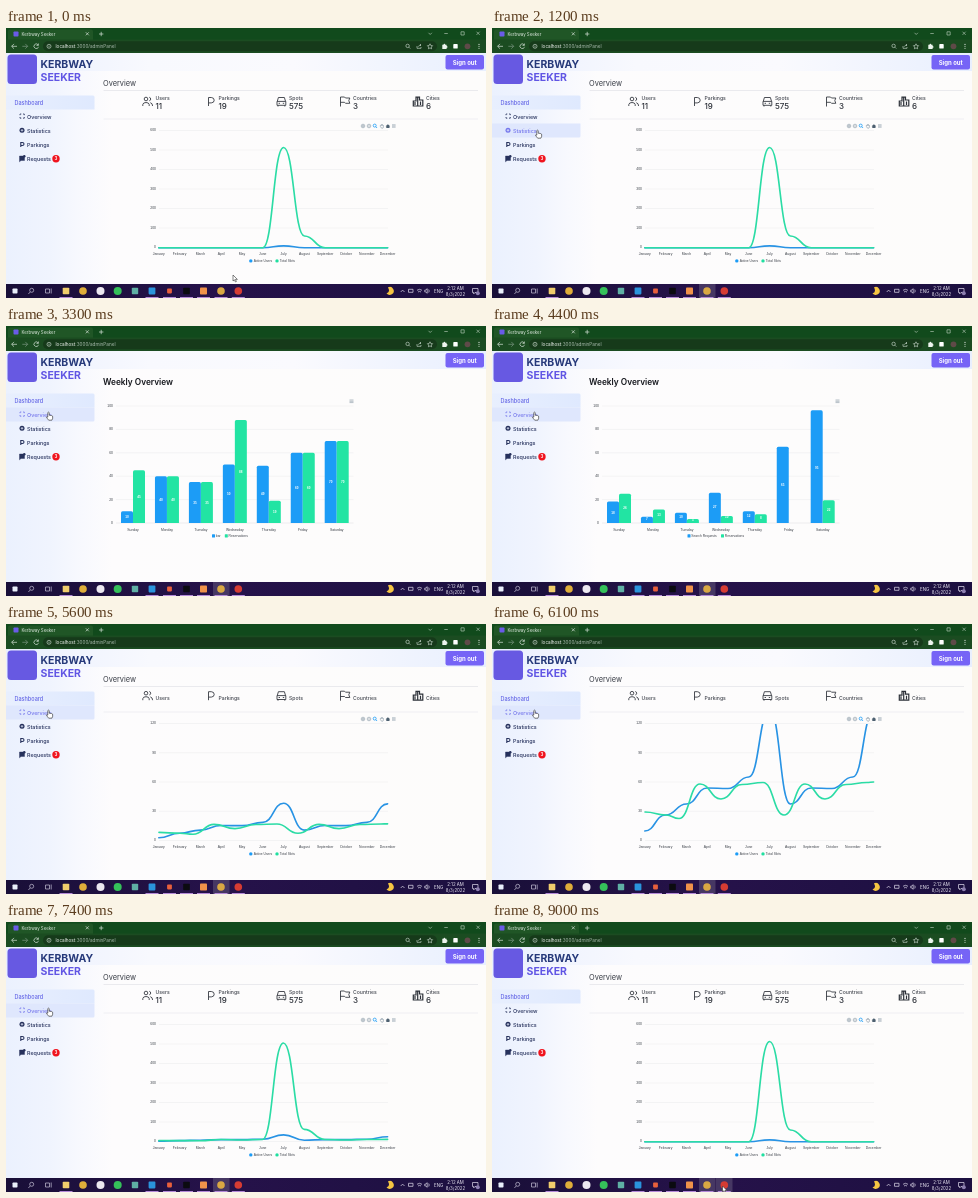
These frames come from a looping animation (480 px wide and 270 px high, 9.1 s). An HTML page:

```html
<!DOCTYPE html>
<html lang="en">
<head>
<meta charset="utf-8">
<title>Kerbway Seeker</title>
<style>
  html, body { margin: 0; width: 100%; height: 100%; overflow: hidden; background: #fff; }
  svg { display: block; width: 100vw; height: 100vh; }
  text { font-family: Inter, "Open Sans", sans-serif; }
  .b { font-weight: 700; }
  .s { font-weight: 600; }
  .m { font-weight: 500; }
  .chart text { font: 3.4px "Liberation Sans", Arial, sans-serif; fill: #3a3f47; }
  .chart .val { font-size: 3.1px; font-weight: 700; fill: #fff; text-anchor: middle; }
  .mid { text-anchor: middle; }
  .end { text-anchor: end; }
  .ui { font-family: "Open Sans", "Noto Sans", sans-serif; }
  .line { fill: none; stroke-width: 1.65; stroke-linejoin: round; stroke-linecap: round; }
  .item { fill: #26315c; stroke: #26315c; }
  .item text { stroke: none; }
  .item .band { fill: none; stroke: none; }
  .item.on { fill: #7577ec; stroke: #7577ec; }
  .item.on .band { fill: #dfe7fd; }
</style>
</head>
<body>
<svg viewBox="0 0 480 270" preserveAspectRatio="none">
  <defs>
    <linearGradient id="page">
      <stop offset="0" stop-color="#ebf1fe"/><stop offset=".09" stop-color="#f0f4fe"/>
      <stop offset=".16" stop-color="#f8f9fe"/><stop offset=".22" stop-color="#fdfcfd"/>
      <stop offset="1" stop-color="#fdfcfb"/>
    </linearGradient>
    <linearGradient id="head">
      <stop offset="0" stop-color="#e9effe"/><stop offset=".3" stop-color="#f8f9fe"/>
      <stop offset=".6" stop-color="#fafafe"/><stop offset="1" stop-color="#e8effe"/>
    </linearGradient>
    <linearGradient id="band">
      <stop offset="0" stop-color="#e8effe"/><stop offset="1" stop-color="#dfe9fe"/>
    </linearGradient>
    <linearGradient id="task">
      <stop offset="0" stop-color="#190f38"/><stop offset=".45" stop-color="#26124a"/>
      <stop offset="1" stop-color="#1c1040"/>
    </linearGradient>
    <clipPath id="plot"><rect x="150" y="100" width="234" height="122"/></clipPath>
    <clipPath id="barBox"><rect x="108" y="78" width="242" height="119"/></clipPath>
  </defs>

  <rect width="480" height="270" fill="url(#page)"/>
  <rect y="25" width="480" height="18" fill="url(#head)"/>

  <!-- browser -->
  <g class="ui">
    <rect width="480" height="12" fill="#114a1c"/>
    <path d="M2 12V3.500q0-2 2-2h81q2 0 2 2V12z" fill="#205626"/>
    <rect y="11.500" width="480" height="13.500" fill="#1b4c21"/>
    <rect x="37" y="13.300" width="394" height="10" rx="5" fill="#163a1a"/>
    <rect x="7.500" y="3.500" width="5" height="5" rx=".8" fill="#6a5be8"/>
    <text x="15.500" y="7.700" font-size="4.400" fill="#dfeae1">Kerbway Seeker</text>
    <text x="49.500" y="20" font-size="4.650" fill="#f2f6f3">localhost<tspan fill="#a9bbae">:3000/adminPanel</tspan></text>
    <g fill="none" stroke="#d6e2d8" stroke-width=".7">
      <path d="M79.800 4.300l3 3m0-3l-3 3M93 6h4.400M95.200 3.800v4.400"/>
      <path d="M422.500 4.800l1.700 1.700 1.700-1.700M438.300 5.500h3.500M455 3.800h3.200v3.200H455zM470.500 3.700l3.200 3.200m0-3.200l-3.200 3.200" stroke="#a9c0ad"/>
      <path d="M11 18.300H5.700m2.300-2.400l-2.400 2.400 2.400 2.400"/>
      <path d="M16.300 18.300h5.300m-2.300-2.400l2.400 2.400-2.400 2.400" stroke="#7d9884"/>
      <path d="M32 16.700a2.300 2.300 0 1 0 .5 2.100M32.400 15.500v1.900h-1.900"/>
      <g stroke-width=".6"><circle cx="43" cy="18.300" r="2"/><path d="M43 17.900v1.500M43 17v.4"/>
      <circle cx="401.600" cy="17.900" r="1.700"/><path d="M402.900 19.200l1.400 1.400M411 18v2.300h4V19M412.500 18.700q.3-1.700 2.500-1.700m-1-1l1 1-1 1"/>
      <path d="M424 15.800l.8 1.700 1.800.2-1.300 1.300.3 1.800-1.600-.9-1.600.9.300-1.800-1.300-1.300 1.800-.2z"/></g>
    </g>
    <path d="M436.300 16.700h1.200a.9.900 0 0 1 1.800 0h1.300v1.300a.9.900 0 0 1 0 1.800v1.200h-4.300z" fill="#eef5ef"/>
    <rect x="447.300" y="16" width="4.400" height="4.600" rx=".7" fill="#fff"/>
    <circle cx="461.500" cy="18.300" r="2.900" fill="#5f4a48"/>
    <g fill="#e3ece5"><circle cx="473" cy="16.400" r=".55"/><circle cx="473" cy="18.300" r=".55"/><circle cx="473" cy="20.200" r=".55"/></g>
  </g>

  <!-- page header -->
  <rect x="1.500" y="26.500" width="29.500" height="29.500" rx="3.500" fill="#6759e2"/>
  <text class="b" x="34.500" y="39.500" font-size="10.500" fill="#26397a">KERBWAY</text>
  <text class="b" x="34.500" y="52.500" font-size="10.500" fill="#6156e4">SEEKER</text>
  <rect x="439.500" y="27" width="38.500" height="14.500" rx="2" fill="#7664f6"/>
  <text class="b mid" x="458.700" y="36.500" font-size="6" fill="#fff">Sign out</text>

  <!-- sidebar -->
  <path d="M0 67.500h87q1.500 0 1.500 1.500v12.500H0z" fill="url(#band)"/>
  <text class="m" x="8.500" y="76.500" font-size="5.500" fill="#6466e6">Dashboard</text>
  <g id="menu"></g>
  <circle cx="50" cy="130.700" r="3.700" fill="#f0141e"/>
  <text class="b mid" x="50" y="132.300" font-size="4.400" fill="#fff">3</text>

  <!-- overview page -->
  <g id="overview">
    <text x="97" y="57.700" font-size="7.400" fill="#3a3e47">Overview</text>
    <path d="M97.500 62.500H472" stroke="#e2e3e9" stroke-width=".7"/>
    <g id="lower">
      <path d="M97.500 91H472" stroke="#e8e9ee" stroke-width=".7"/>
      <g id="stats"></g>
      <g class="chart">
        <g fill="none" stroke="#8595a3" stroke-width=".6">
          <circle cx="357" cy="98" r="1.800"/><path d="M356 98h2M357 97v2"/>
          <circle cx="363" cy="98" r="1.800"/><path d="M362 98h2"/>
          <g stroke="#1c9cf6" stroke-width=".8"><circle cx="368.700" cy="97.600" r="1.500"/><path d="M369.800 98.700l1.300 1.300"/></g>
          <path d="M374.400 98.500v-1.500m1-1v2m1-2v2m1-1v2q0 1.300-1.300 1.300-1 0-1.700-1.800"/>
          <path d="M386 96.800h3.600M386 98h3.600M386 99.200h3.600"/>
        </g>
        <path d="M379.600 98.200l2.300-2 2.300 2h-.7v1.700h-3.200v-1.700z" fill="#4d6070"/>
        <g id="lineGrid"></g>
        <circle cx="244.800" cy="232.900" r="1.700" fill="#1c9cf6"/><text x="247.700" y="234.200" style="font-size:3.300px">Active Users</text>
        <circle cx="271" cy="232.900" r="1.700" fill="#20dfa0"/><text x="273.800" y="234.200" style="font-size:3.300px">Total Slots</text>
      </g>
    </g>
    <g clip-path="url(#plot)">
      <path id="users" class="line" stroke="#2893e4"/>
      <path id="slots" class="line" stroke="#2bdca5"/>
    </g>
  </g>

  <!-- statistics page -->
  <g id="weekly" class="chart">
    <text x="97" y="59" style="font:600 8.300px Inter,sans-serif;fill:#14161c">Weekly Overview</text>
    <path d="M343.500 74h4M343.500 75.300h4M343.500 76.600h4" stroke="#8595a3" stroke-width=".6"/>
    <g id="barGrid"></g>
    <g id="bars" clip-path="url(#barBox)"></g>
    <g id="legend"></g>
  </g>

  <!-- taskbar -->
  <rect y="256" width="480" height="14" fill="url(#task)"/>
  <g id="tasks" class="ui"></g>

  <g id="arrow"><path d="M0 0v6l1.400-1.200 1 2.100 1-.4-1-2.100h2z" fill="#fff" stroke="#333" stroke-width=".6"/></g>
  <g id="hand"><path d="M-.7.600q.7-1 1.400 0v2.600q2.500 0 3.400 1 .5 2.100-.7 4H.2q-1.400-1.500-2.200-3.200.4-1 1.300.1z" fill="#fff" stroke="#222" stroke-width=".6"/></g>
</svg>

<script>
const LOOP = 9100, BLUE = '#1c9cf6', GREEN = '#22e4a3';
const TO_STATS = 1250, GROW = 1350, REAL_BARS = 3850, TO_OVERVIEW = 5300, REAL_LINES = 6700;
const $ = id => document.getElementById(id);
const clamp = v => Math.min(1, Math.max(0, v));
const mix = (a, b, k) => a + (b - a) * k;
const swing = p => { const u = clamp(p) - 1; return u * u * (2.70158 * u + 1.70158) + 1; };
const sine = p => (1 - Math.cos(Math.PI * clamp(p))) / 2;
const show = (el, on) => el.setAttribute('display', on ? 'inline' : 'none');
const label = (x, y, s, cls = 'mid') => `<text class="${cls}" x="${x}" y="${y}">${s}</text>`;

// sidebar
const glyphs = [
  '<path d="M14 87.200v-1.200h1.300M17 86h1.300v1.200M18.300 89v1.200H17M15.300 90.200H14V89" fill="none" stroke-width=".8"/>',
  '<circle cx="16" cy="102.300" r="2.500" stroke="none"/><path d="M14.700 102.300h2.600M16 101v2.600" stroke="#eaf0ff" stroke-width=".7"/>',
  '<path d="M14.800 119v-4.500h1.500q1.700.1 1.700 1.500t-1.700 1.500h-1.400" fill="none" stroke-width="1.100"/>',
  '<path d="M13.500 128h5v4.500h-3.500l-1.500 1.300z" stroke-width=".4"/><circle cx="18.300" cy="128.300" r="1.200" stroke="none"/>'
];
$('menu').innerHTML = ['Overview', 'Statistics', 'Parkings', 'Requests'].map((s, i) =>
  `<g class="item"><path class="band" d="M0 ${81.5 + i * 14}h88.500v12.500q0 1.500-1.500 1.500H0z"/>${glyphs[i]}
   <text class="m" x="21" y="${90.5 + i * 14}" font-size="5.400">${s}</text></g>`).join('');
const items = [...document.querySelectorAll('.item')];

// figures above the line chart
const icons = [
  '<circle cx="140" cy="71" r="1.800"/><path d="M136.800 78v-1.500q.3-2 3.200-2t3.200 2V78M143.300 69.300a1.800 1.800 0 0 1 0 3.500M144.300 74.700q2.300.5 2.300 3.300"/>',
  '<path d="M202.500 78v-8.500h2.800q2.900.2 2.900 2.700t-2.900 2.700h-2.700"/>',
  '<path d="M271.300 73.300l1.100-3.800h6l1.100 3.800M271 73.400h8.800v3.900H271zM272 77.300v1.200M278.800 77.300v1.200M272.600 75.300h1.400M276.800 75.300h1.400"/>',
  '<path d="M334.500 78.500v-9.500h4l1 1h4.300l-1 2.600 1 2.700h-4.300l-1-1h-4"/>',
  '<path d="M407.300 78v-5h2.700v-3.800h3.500v2.800h3.300v6zM411.700 69.200V78M409 74v3M414.500 73.500V77" stroke-width="1.200"/>'
];
const stats = [['Users', 149.5, 11], ['Parkings', 212.5, 19], ['Spots', 283, 575], ['Countries', 347, 3], ['Cities', 420, 6]];
$('stats').innerHTML = stats.map(([s, x, n], i) =>
  `<g fill="none" stroke="#2c3038" stroke-width=".85">${icons[i]}</g>
   <text class="m name" x="${x}" y="71.700" font-size="5.100" fill="#40444d">${s}</text>
   <text class="m count" x="${x}" y="80.700" font-size="8" fill="#2c3038">${n}</text>`).join('');

// line chart
const monthX = i => 152.8 + i * 20.8;
const months = ['January', 'February', 'March', 'April', 'May', 'June', 'July',
  'August', 'September', 'October', 'November', 'December'];
function lineGrid(max, steps) {
  let s = '';
  for (let i = 0; i <= steps; i++) {
    const y = 219.5 - i * 117 / steps;
    s += `<path d="M153 ${y}H382" stroke="#e9e9eb" stroke-width=".5"/>` + label(150, y + .9, max / steps * i, 'end');
  }
  return s + months.map((m, i) => label(monthX(i), 227.2, m)).join('');
}
const draftUsers = [207, 191, 180, 164, 164.5, 153, 86, 180, 164, 164.5, 153, 88].map((y, i) => [monthX(i), y]);
const realUsers = draftUsers.map(([x], i) => [x, i === 6 ? 217.8 : 219.7]);
const draftSlots = [[153, 188], [174, 191], [187, 194.5], [208, 160], [229, 175], [250, 160.5], [271, 158.5],
  [292, 191], [313, 160], [333, 175], [354, 160.5], [375, 158.5], [381.6, 158]];
const realSlots = draftSlots.map((p, i) => [monthX(Math.min(i, 11)), i === 6 ? 119.5 : i === 7 ? 208 : 219.7]);

function curve(pts) {
  return pts.map(([x, y], i) => {
    if (!i) return `M${x} ${y}`;
    const [px, py] = pts[i - 1], m = (px + x) / 2;
    return `C${m} ${py} ${m} ${y} ${x} ${y}`;
  }).join('');
}
function trace(draft, real, t, loaded) {
  const up = sine((t - TO_OVERVIEW - 50) / 700), k = loaded ? sine((t - REAL_LINES) / 800) : 0;
  if (t < TO_OVERVIEW) return curve(real);
  return curve(draft.map(([x, y], i) => [mix(x, real[i][0], k), mix(mix(216.5, y, up), real[i][1], k)]));
}

// bar chart
const days = ['Sunday', 'Monday', 'Tuesday', 'Wednesday', 'Thursday', 'Friday', 'Saturday'];
const draftBars = [[10, 45], [40, 40], [35, 35], [50, 88], [49, 19], [60, 60], [70, 70]];
const realBars = [[18, 26], [7, 13], [10, 5], [27, 10], [12, 8], [65, 0], [95, 22]];
const dayX = i => 127 + i * 33.95;
let grid = '';
for (let i = 0; i <= 5; i++) {
  const y = 197 - i * 23.4;
  grid += `<path d="M110 ${y}H347.500" stroke="${i ? '#e9e9eb' : '#d8d9dd'}" stroke-width=".5"/>` + label(107, y + .9, i * 20, 'end');
}
$('barGrid').innerHTML = grid + days.map((d, i) => label(dayX(i), 204.6, d)).join('');

function bars(t) {
  const real = t >= REAL_BARS;
  let rects = '', vals = '';
  days.forEach((_, i) => [0, 1].forEach(j => {
    const a = draftBars[i][j], b = realBars[i][j], goal = real ? b : a;
    const v = real ? mix(a, b, swing((t - REAL_BARS) / 700))
                   : a * swing((t - GROW - i * 110 - j * 8) / 1000);
    const x = dayX(i) - 12 + j * 12, h = Math.max(0, v * 1.17), r = Math.min(1.6, h);
    if (h > .1) rects += `<path d="M${x} 197v${r - h}q0 ${-r} ${r} ${-r}h${12 - 2 * r}q${r} 0 ${r} ${r}V197z" fill="${j ? GREEN : BLUE}"/>`;
    if (goal && t > GROW) vals += label(x + 6, 198.1 - goal * .585, goal, 'val');
  }));
  return rects + vals;
}
function legend(real) {
  const x = real ? 195.5 : 206, x2 = real ? 229 : 218.8;
  return [[x, BLUE, real ? 'Search Requests' : 'bar'], [x2, GREEN, 'Reservations']].map(([lx, c, s]) =>
    `<rect x="${lx}" y="208.300" width="3" height="3.200" rx=".5" fill="${c}"/>
     <text x="${lx + 3.8}" y="211.200" style="font-size:3.300px">${s}</text>`).join('');
}

// taskbar
const disc = (x, c, r = 4) => `<circle cx="${x}" cy="263" r="${r}" fill="${c}"/>`;
const box = (x, c, r = 3.6) => `<rect x="${x - r}" y="${263 - r}" width="${2 * r}" height="${2 * r}" rx=".8" fill="${c}"/>`;
const tile = (id, x) => `<rect id="${id}" x="${x}" y="256" width="16.500" height="14" fill="#463763"/>`;
$('tasks').innerHTML =
  tile('browserTile', 207) + tile('recordTile', 224) + box(9, '#e9effa', 2.5) +
  '<g fill="none" stroke="#c9c4d8" stroke-width=".7"><circle cx="25.700" cy="262.300" r="2"/><path d="M24.200 264l-1.800 2M39.500 261h4v4h-4zM45.200 260.500v5"/></g>' +
  box(60, '#f0cd6c', 3.3) + disc(77, '#dfae3a', 3.8) + disc(94.5, '#ece8f0') + disc(111.7, '#35c15a') + box(129, '#5fb0a4', 3.2) +
  box(146, '#2a94dc', 3.4) + box(163.5, '#e8603c', 2.4) + box(180.5, '#0b0b10', 3.3) + box(197.5, '#f0924a', 3.5) +
  disc(215, '#d9a843', 3.8) + disc(232.3, '#d63c33', 3.8) +
  [60, 146, 163.5, 180.5, 197.5, 215, 232.3].map(x => `<path d="M${x - 6.5} 269.500h13" stroke="#b48ad8" stroke-width="1"/>`).join('') +
  '<path d="M382 259.300a4 4 0 1 1-1.500 6q4-.8 1.500-6z" fill="#f5c542"/>' +
  '<g fill="none" stroke="#e2dfee" stroke-width=".7"><path d="M394.700 264l1.900-1.900 1.900 1.900M402.500 261.300h4.500v3h-4.500zM411 262.300q2.500-2 5 0M412 264q1.500-1.200 3 0M418.800 262v2h1l1.400 1.300v-4.600l-1.400 1.300zM422.700 261.500q1 1.500 0 3"/>' +
  '<path d="M466.500 260.500h5.500v4h-3l-1.300 1.400v-1.400h-1.200z"/></g>' +
  '<circle cx="471.800" cy="265.200" r="2" fill="#8d7fb0"/>' +
  '<g fill="#ece9f5" font-size="4.400"><text x="428" y="264.700">ENG</text><text class="mid" x="449.500" y="261.700">2:12 AM</text><text class="mid" x="449.500" y="268">8/3/2022</text></g>';

// pointer stops: time, x, y
const stops = [[0, 227, 247], [80, 227, 247], [950, 48, 109], [1200, 45.5, 102], [3050, 45.5, 102],
  [3250, 42.5, 86], [7550, 42.5, 86], [8200, 203, 217], [8650, 230.5, 264], [LOOP, 230.5, 264]];
function pointer(t) {
  const i = stops.findIndex((s, n) => n && t <= s[0]);
  const a = stops[i - 1], b = stops[i], k = sine((t - a[0]) / (b[0] - a[0]));
  return [mix(a[1], b[1], k), mix(a[2], b[2], k)];
}

const grids = { draft: lineGrid(120, 4), real: lineGrid(600, 6) };
const texts = { names: document.querySelectorAll('.name'), counts: document.querySelectorAll('.count') };
let mode = '';
function setOverview(loaded) {
  $('lineGrid').innerHTML = loaded ? grids.real : grids.draft;
  $('lower').setAttribute('transform', `translate(0 ${loaded ? 0 : -3})`);
  $('stats').setAttribute('transform', `translate(0 ${loaded ? 0 : 1.2})`);
  texts.names.forEach(n => n.setAttribute('y', loaded ? 71.7 : 77.7));
  texts.counts.forEach(n => show(n, loaded));
}

function draw(t) {
  const weekly = t >= TO_STATS && t < TO_OVERVIEW;
  const loaded = t < TO_STATS || t >= REAL_LINES;
  const next = `${weekly}${loaded}${t >= REAL_BARS}`;
  if (next !== mode) {
    mode = next;
    show($('weekly'), weekly);
    show($('overview'), !weekly);
    if (weekly) $('legend').innerHTML = legend(t >= REAL_BARS);
    else setOverview(loaded);
  }
  if (weekly) $('bars').innerHTML = bars(t);
  else {
    $('users').setAttribute('d', trace(draftUsers, realUsers, t, loaded));
    $('slots').setAttribute('d', trace(draftSlots, realSlots, t, loaded));
  }

  const [x, y] = pointer(t);
  const over = x < 88 && y >= 82 ? Math.floor((y - 82) / 14) : -1;
  const onItem = over >= 0 && over < items.length;
  items.forEach((el, i) => el.classList.toggle('on', i === over));
  show($('hand'), onItem);
  show($('arrow'), !onItem);
  $(onItem ? 'hand' : 'arrow').setAttribute('transform', `translate(${x} ${y})`);
  show($('browserTile'), t > 950);
  show($('recordTile'), y > 256);
}

const begin = performance.now();
function tick() {
  draw((performance.now() - begin) % LOOP);
  requestAnimationFrame(tick);
}
tick();
</script>
</body>
</html>
```
